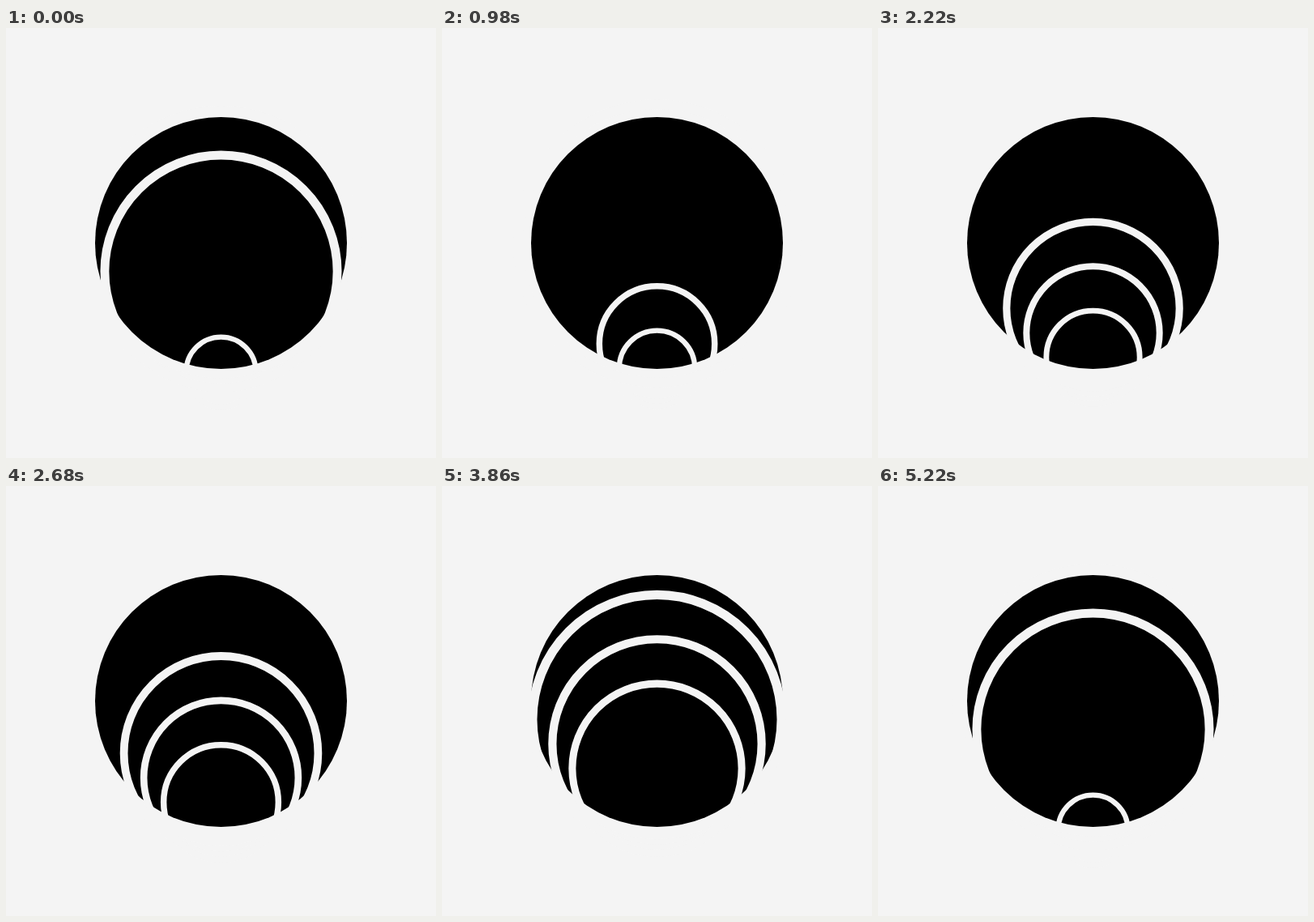
Recreate the animation shown at these times as an HTML page with a canvas. Size 531 px wide and 531 px high, loop 5.24 s.

```html
<!DOCTYPE html>
<html lang="en">
<head>
<meta charset="utf-8">
<title>Rising rings</title>
<style>
  html, body { margin: 0; width: 100%; height: 100%; overflow: hidden; background: #f4f4f4; }
  canvas { display: block; }
</style>
</head>
<body>
<canvas width="531" height="531"></canvas>
<script>
const ctx = document.querySelector('canvas').getContext('2d');
const BG = '#f4f4f4';
const MID = 265.5;
const LOOP = 5240, STEP = 20;
const CYCLE = LOOP - STEP;   // the last step repeats the first pose
const SPEED = 0.0647;        // px per ms
const GAP = 55.4;

// A ring is described by the height of its outer top edge.
function ring(top) {
  const outer = 75 + (315 - top) * 0.453;
  if (outer < 20) return;
  const width = 4.1 + outer * 0.0455;
  ctx.lineWidth = width;
  ctx.beginPath();
  ctx.arc(MID, top + outer, outer - width / 2, 0, Math.PI * 2);
  ctx.stroke();
}

function draw(time) {
  ctx.fillStyle = BG;
  ctx.fillRect(0, 0, 531, 531);
  ctx.fillStyle = '#000';
  ctx.beginPath();
  ctx.arc(MID, MID, 155.5, 0, Math.PI * 2);
  ctx.fill();

  ctx.strokeStyle = BG;
  for (let i = 0; i < 3; i++) {
    for (const turn of [-1, 0, 1]) {
      const top = 378.5 + i * GAP - SPEED * (time - turn * CYCLE);
      if (top > 85 && top < 425) ring(top);
    }
  }
}

const start = performance.now();
function frame() {
  const time = (performance.now() - start) % LOOP;
  draw(Math.floor(time / STEP) * STEP);
  requestAnimationFrame(frame);
}
frame();
</script>
</body>
</html>
```
